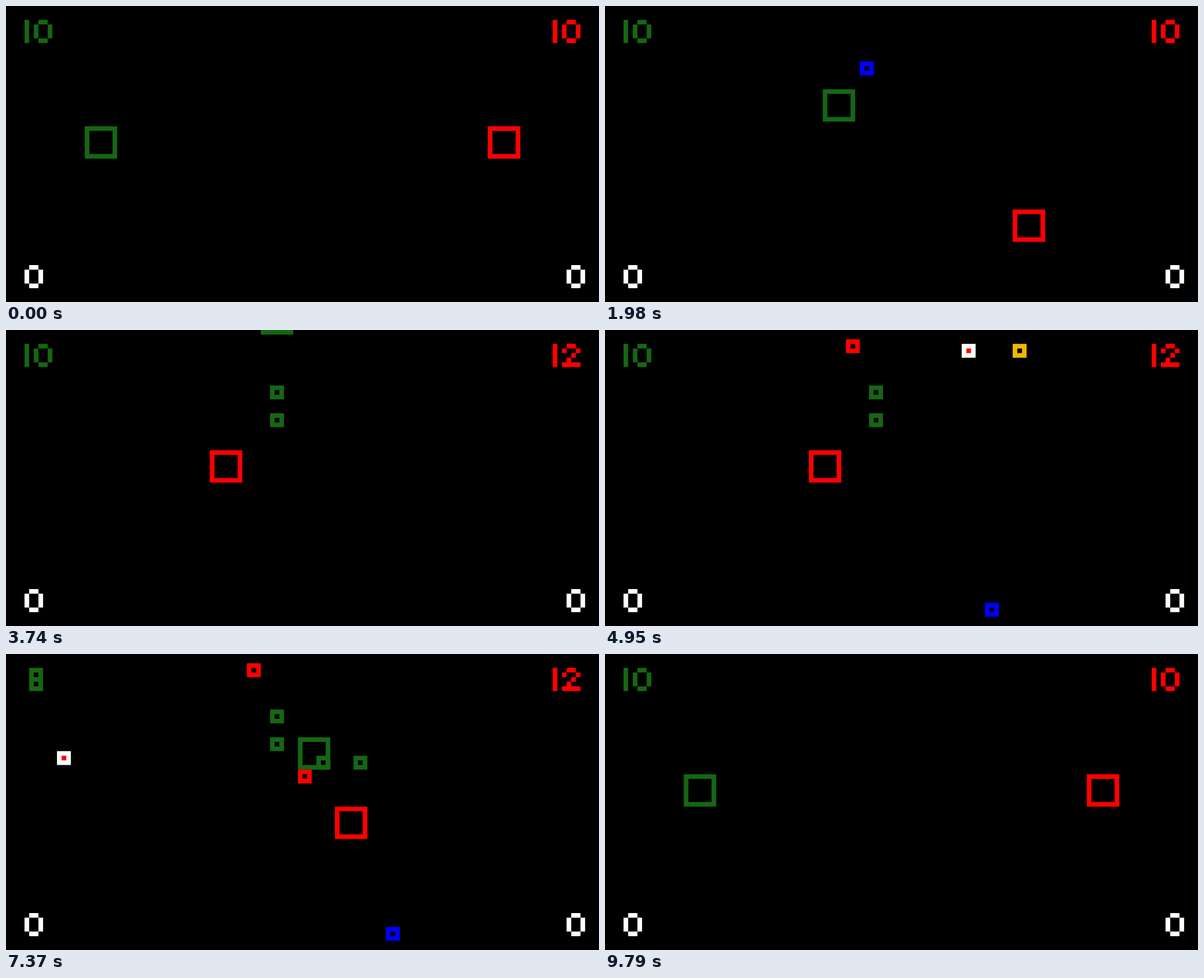
An HTML page with a canvas that plays this animation: 1058x529 px, repeating every 9900 ms.

```html
<!DOCTYPE html>
<html lang="en">
<head>
<meta charset="utf-8">
<title>Square duel</title>
<style>
html, body { margin: 0; width: 100%; height: 100%; overflow: hidden; background: #000; }
canvas { display: block; }
</style>
</head>
<body>
<canvas id="stage" width="1058" height="529"></canvas>
<script>
const ctx = document.getElementById('stage').getContext('2d');
const COLS = 128, ROWS = 64, STEP = 110, STEPS = 90, RESET = 89, BOX = 7, ITEM = 3;
const GREEN = '#166614', RED = '#f00', BLUE = '#00f', GOLD = '#f0b800', WHITE = '#fff';

// All drawing is in cells of the game grid
ctx.scale(1058 / COLS, 529 / ROWS);

// Turning points of the players: [step, x, y]
const green = route([
  [0, 17, 26], [10, 33, 22], [23, 55, 16], [25, 55, 12], [35, 55, -8], [45, 79, -8],
  [52, 82, 0], [58, 65, 20], [62, 73, 20], [75, 47, 14], [84, 11, 14]
]);
const red = route([
  [0, 104, 26], [10, 90, 32], [17, 90, 46], [25, 70, 26], [32, 44, 26], [45, 44, 26],
  [60, 58, 26], [70, 76, 36], [75, 80, 46], [80, 80, 55]
]);

// Pickups last until a player touches them
const pickups = [
  pickup(55, 12, BLUE, 5), pickup(92, 48, GOLD, 8), pickup(65, 25, WHITE, 21),
  pickup(82, 59, BLUE, 35), pickup(88, 3, GOLD, 36), pickup(77, 3, WHITE, 38),
  pickup(11, 21, WHITE, 66), pickup(97, 23, WHITE, 73)
];

// Mines stay; green drops its own from the middle of its box
const mines = [
  ...[23, 26, 58, 62].map(from => {
    const [x, y] = green(from);
    return { x: x + 2, y: y + 2, color: GREEN, from };
  }),
  { x: 52, y: 2, color: RED, from: 42 },
  { x: 63, y: 25, color: RED, from: 55 }
];

const glyphs = {
  0: ['.##.', '#..#', '#..#', '#..#', '.##.'],
  1: ['#', '#', '#', '#', '#'],
  2: ['.##.', '#..#', '..#.', '.#..', '####'],
  8: ['###', '#.#', '###', '#.#', '###']
};

function route(keys) {
  return step => {
    const next = keys.findIndex(key => key[0] > step);
    if (next < 0) return keys[keys.length - 1].slice(1);
    const a = keys[next - 1], b = keys[next];
    const k = (step - a[0]) / (b[0] - a[0]);
    return [1, 2].map(i => Math.round(a[i] + (b[i] - a[i]) * k));
  };
}

function pickup(x, y, color, from) {
  const touches = ([px, py]) =>
    px < x + ITEM && px + BOX > x && py < y + ITEM && py + BOX > y;
  let to = from;
  while (to < RESET && !touches(green(to)) && !touches(red(to))) to++;
  return { x, y, color, from, to };
}

function frame(x, y, size, color) {
  ctx.strokeStyle = color;
  ctx.strokeRect(x + 0.5, y + 0.5, size - 1, size - 1);
}

function drawItem({ x, y, color, from, to = RESET }, step) {
  if (step < from || step >= to) return;
  if (color !== WHITE) return frame(x, y, ITEM, color);
  ctx.fillStyle = WHITE;
  ctx.fillRect(x, y, ITEM, ITEM);
  ctx.fillStyle = RED;
  ctx.fillRect(x + 1, y + 1, 1, 1);
}

function number(value, x, y, color) {
  ctx.beginPath();
  for (const digit of String(value)) {
    const rows = glyphs[digit];
    rows.forEach((row, j) => [...row].forEach((mark, i) => {
      if (mark === '#') ctx.rect(x + i, y + j, 1, 1);
    }));
    x += rows[0].length + 1;
  }
  ctx.fillStyle = color;
  ctx.fill();
}

function draw(step) {
  ctx.fillStyle = '#000';
  ctx.fillRect(0, 0, COLS, ROWS);
  frame(...green(step), BOX, GREEN);
  frame(...red(step), BOX, RED);
  [...pickups, ...mines].forEach(item => drawItem(item, step));
  const hurt = step >= 54;
  number(hurt ? 8 : 10, hurt ? 5 : 4, 3, GREEN);
  number(10 + (step >= 26) + (step >= 33), 118, 3, RED);
  number(0, 4, 56, WHITE);
  number(0, 121, 56, WHITE);
}

function tick() {
  const step = Math.floor(performance.now() / STEP) % STEPS;
  draw(step % RESET);
  requestAnimationFrame(tick);
}
tick();
</script>
</body>
</html>
```
